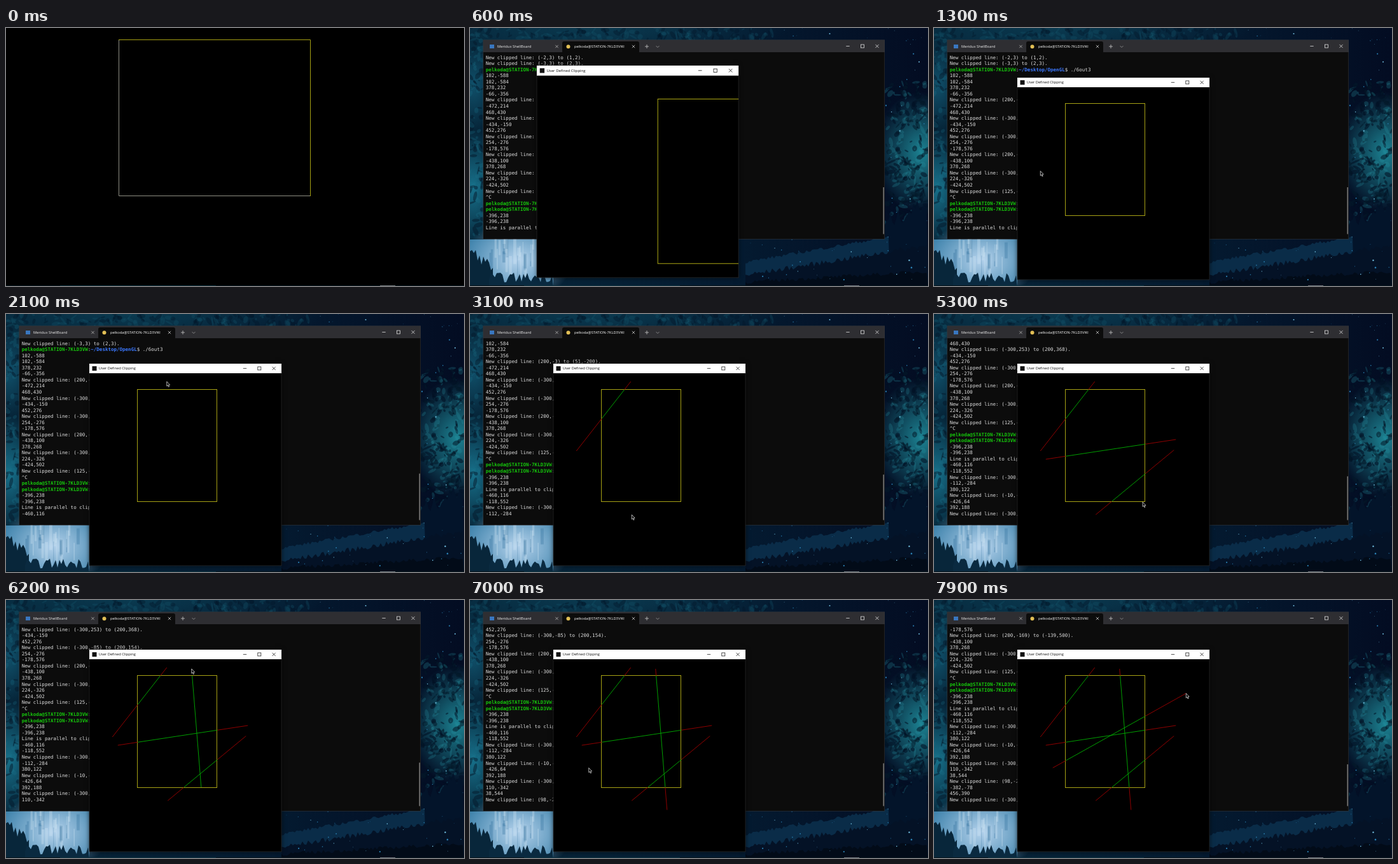
An HTML page with a canvas for the animation above (8 s loop, 720 by 405 pixels).

```html
<!DOCTYPE html>
<html>
<head>
<meta charset="utf-8">
<style>
  html, body { margin: 0; height: 100%; overflow: hidden; background: #000; }
  canvas { display: block; width: 100vw; height: 100vh; }
</style>
</head>
<body>
<canvas id="stage" width="720" height="405"></canvas>
<script>
const LOOP = 8000, STEP = 100, RESTORE = 600, REST = 200;
const UI = '"Open Sans", sans-serif', MONO = '"DejaVu Sans Mono", monospace';
const USER = 'pelkoda@STATION-7KLD3VW';
const YELLOW = '#a6a114', RED = '#a00000', GREEN = '#00b000';
let ctx = document.getElementById('stage').getContext('2d');

// Clip region and clicks in the program's own coordinates
const REGION = { left: -300, right: 200, bottom: -200, top: 500 };
const earlierClicks = [
  [378, 232], [-66, -356], [-472, 214], [468, 430], [-434, -150], [452, 276],
  [254, -276], [-178, 576], [-438, 100], [378, 268], [224, -326], [-424, 502]
];
const clicks = [
  { time: 1500, at: [-460, 116] }, { time: 2300, at: [-118, 552] },
  { time: 3100, at: [-112, -284] }, { time: 3600, at: [380, 122] },
  { time: 4400, at: [-426, 64] }, { time: 4900, at: [392, 188] },
  { time: 5700, at: [110, -342] }, { time: 6300, at: [38, 544] },
  { time: 7200, at: [-382, -78] }, { time: 7900, at: [456, 390] }
];
// The pointer comes in from the corner, hovers, then visits every click
const stops = [{ time: 700, at: [1470, 940] }, { time: 1300, at: [-460, 78] }, ...clicks];

const lerp = (a, b, k) => a + (b - a) * k;
const toStage = ([x, y]) => [282.25 + x / 4, 244 - y / 4];

function clip([x0, y0], [x1, y1]) {
  const dx = x1 - x0, dy = y1 - y0;
  let enter = 0, leave = 1;
  for (const [p, q] of [[-dx, x0 - REGION.left], [dx, REGION.right - x0],
                        [-dy, y0 - REGION.bottom], [dy, REGION.top - y0]]) {
    if (p < 0) enter = Math.max(enter, q / p);
    if (p > 0) leave = Math.min(leave, q / p);
  }
  return [enter, leave].map(u => [x0 + u * dx, y0 + u * dy]);
}

function logClicks(points) {
  return points.flatMap((point, i) => {
    if (i % 2 === 0) return [point.join()];
    const [a, b] = clip(points[i - 1], point).map(p => p.map(Math.trunc).join());
    return [point.join(), `New clipped line: (${a}) to (${b}).`];
  });
}

const history = [
  'New clipped line: (-2,3) to (1,2).', 'New clipped line: (-3,3) to (2,3).',
  '$ ./6out3', '102,-588', '102,-584', ...logClicks(earlierClicks),
  '^C', '$ ', '$ ./6out3', '-396,238', '-396,238', 'Line is parallel to clipping line.'
];

function path(points, color, width = 1) {
  ctx.strokeStyle = color;
  ctx.lineWidth = width;
  ctx.beginPath();
  points.forEach(p => ctx.lineTo(...p));
  ctx.stroke();
}

function fillPath(points, color) {
  ctx.fillStyle = color;
  ctx.beginPath();
  points.forEach(p => ctx.lineTo(...p));
  ctx.fill();
}

function rect(x, y, w, h, color) {
  ctx.fillStyle = color;
  ctx.fillRect(x, y, w, h);
}

function frame(x, y, w, h, color, width = 1) {
  ctx.strokeStyle = color;
  ctx.lineWidth = width;
  ctx.strokeRect(x, y, w, h);
}

function ellipse(x, y, rx, ry, turn, color) {
  ctx.fillStyle = color;
  ctx.beginPath();
  ctx.ellipse(x, y, rx, ry, turn, 0, 7);
  ctx.fill();
}

function text(str, x, y, color, font) {
  ctx.font = font;
  ctx.fillStyle = color;
  ctx.fillText(str, x, y);
}

function cross(x, y, r, color) {
  path([[x - r, y - r], [x + r, y + r]], color, 0.8);
  path([[x - r, y + r], [x + r, y - r]], color, 0.8);
}

function windowButtons(x, y, gap, color) {
  path([[x - 2.7, y], [x + 2.7, y]], color, 0.8);
  frame(x + gap - 2.5, y - 2.5, 5, 5, color, 0.8);
  cross(x + 2 * gap, y, 2.6, color);
}

function paintWallpaper() {
  let seed = 7;
  const random = (from = 0, to = 1) =>
    lerp(from, to, (seed = seed * 16807 % 2147483647) / 2147483647);

  function glow(x, y, rx, ry, color) {
    ctx.save();
    ctx.translate(x, y);
    ctx.scale(rx, ry);
    const g = ctx.createRadialGradient(0, 0, 0, 0, 0, 1);
    g.addColorStop(0, color);
    g.addColorStop(1, color + '00');
    rect(-1, -1, 2, 2, g);
    ctx.restore();
  }
  function mottle(x, y, w, h, count, colors) {
    for (let i = 0; i < count; i++) {
      ellipse(x + random(0, w), y + random(0, h), random(1, 4), random(1, 8),
              random(0, 3), colors[i % colors.length]);
    }
  }
  // Everything below a rough line
  function ridge(x0, y0, x1, y1, rough, color) {
    const points = [[x0, 405]];
    for (let x = x0; x <= x1; x += 3) {
      points.push([x, lerp(y0, y1, (x - x0) / (x1 - x0)) - random(0, rough)]);
    }
    fillPath([...points, [x1, 405]], color);
  }

  const sky = ctx.createLinearGradient(0, 0, 720, 0);
  sky.addColorStop(0, '#06263a');
  sky.addColorStop(0.6, '#041a30');
  sky.addColorStop(1, '#030c22');
  rect(0, 0, 720, 405, sky);

  glow(200, 0, 300, 50, '#0a3a50');
  mottle(0, 0, 480, 18, 150, ['#03142860', '#14546850']);
  glow(5, 90, 40, 70, '#10506a');
  glow(5, 250, 45, 90, '#17708a');
  mottle(0, 20, 21, 310, 90, ['#03182a80', '#1a738c40']);

  glow(710, 195, 75, 95, '#1c8292');
  mottle(652, 85, 68, 230, 260, ['#03182890', '#02102490', '#2894a240']);
  ridge(652, 320, 720, 285, 25, '#03142a');

  // Mist, falling water and the trees in front
  rect(0, 332, 131, 73, '#3f83ac');
  glow(75, 365, 85, 65, '#b4d2ec');
  for (let i = 0; i < 28; i++) {
    rect(random(24, 126), random(325, 360), random(1, 5), random(15, 45),
         i % 3 ? '#d6e8f650' : '#2d6c9850');
  }
  ridge(0, 358, 36, 385, 18, '#08263a');
  ridge(30, 400, 131, 399, 16, '#0a2a40');

  ridge(433, 370, 660, 330, 5, '#0a2c48');
  ridge(433, 392, 720, 345, 8, '#041226');
  ridge(433, 402, 720, 385, 6, '#020b18');
  for (let i = 0; i < 170; i++) {
    const r = 0.3 + random() * random() * 1.1;
    ellipse(random(440, 720), random(0, 400), r, r, 0, i % 3 ? '#2a7eb0' : '#78c8ea');
  }
}

function makeWallpaper() {
  const canvas = document.createElement('canvas'), stage = ctx;
  canvas.width = 720;
  canvas.height = 405;
  ctx = canvas.getContext('2d');
  paintWallpaper();
  ctx = stage;
  return canvas;
}
const wallpaper = makeWallpaper();

function drawTabs() {
  rect(21, 19, 630.5, 19, '#2e2e32');
  ctx.fillStyle = '#0c0c0c';
  ctx.beginPath();
  ctx.roundRect(145, 21, 121, 20, 3);
  ctx.fill();
  rect(31, 26, 7, 6, '#3977c0');
  ellipse(154.5, 29.3, 3, 3, 0, '#e2bf55');
  text('Meridux ShellBoard', 43, 29.5, '#f0f0f0', '5.8px ' + UI);
  ctx.save();
  ctx.beginPath();
  ctx.rect(160, 20, 88, 18);
  ctx.clip();
  text(USER + ':', 164, 29.5, '#fff', '5.8px ' + UI);
  ctx.restore();
  cross(136.5, 29, 2.2, '#b5b5b5');
  cross(257, 29, 2.2, '#c8c8c8');
  path([[275, 29], [281, 29]], '#c8c8c8', 0.8);
  path([[278, 26], [278, 32]], '#c8c8c8', 0.8);
  path([[292.5, 28], [295, 30.5], [297.5, 28]], '#999', 0.8);
  windowButtons(594, 28.5, 23, '#e0e0e0');
}

function drawTerminal(lines) {
  rect(20.5, 18.5, 631.5, 313, '#3b3b3d');
  rect(21, 38, 630.5, 293, '#0c0c0c');
  drawTabs();
  const first = lines.length - 29, font = '7.53px ' + MONO;
  lines.slice(first).forEach((line, row) => {
    const parts = line[0] === '$'
      ? [[USER, '#16c60c', 'bold '], [':', '#ddd', ''], ['~/Desktop/OpenGL', '#3b78ff', 'bold '], [line, '#ddd', '']]
      : [[line, '#e0e0e0', '']];
    let x = 24.7;
    for (const [str, color, weight] of parts) {
      text(str, x, 46.7 + row * 9.54, color, weight + font);
      x += ctx.measureText(str).width;
    }
  });
  const top = 250 + first * 0.53;
  rect(649.5, top, 1.3, 323.5 - top, '#8d8d8d');
}

function drawClipWindow(x, y, scale, drawContent) {
  ctx.save();
  ctx.translate(x, y);
  ctx.scale(scale, scale);
  ctx.shadowColor = '#000a';
  ctx.shadowBlur = 7;
  rect(0, 0, 302, 317, '#000');
  ctx.shadowBlur = 0;
  frame(0, 0, 302, 317, '#303030', 0.6);
  rect(0, 0, 302, 15, '#fff');
  rect(4.5, 4, 7, 7, '#111');
  text('User Defined Clipping', 14.7, 7.8, '#111', '5.75px ' + UI);
  windowButtons(244.5, 7.4, 22.8, '#222');
  ctx.beginPath();
  ctx.rect(0, 15, 302, 302);
  ctx.clip();
  ctx.translate(-x, -y);
  drawContent();
  ctx.restore();
}

function drawClippedLines(time) {
  frame(206.5, 118.5, 125, 176, YELLOW);
  for (let i = 1; i < clicks.length; i += 2) {
    const start = clicks[i - 1].at, end = clicks[i].at;
    const [a, b] = clip(start, end).map(toStage);
    if (time >= clicks[i].time) {
      path([toStage(start), a], RED, 0.9);
      path([b, toStage(end)], RED, 0.9);
    }
    // The inner part is painted just before the rest
    if (time >= clicks[i].time - STEP) path([a, b], GREEN, 0.9);
  }
}

function drawPointer(time) {
  const next = stops.findIndex(s => s.time > time);
  if (next < 1) return;
  const from = stops[next - 1], to = stops[next];
  const travel = Math.max(STEP, to.time - REST - from.time);
  const u = Math.min(1, (time - from.time) / travel), k = u * u * (3 - 2 * u);
  drawArrow(from.at.map((v, i) => lerp(v, to.at[i], k)));
}

function drawArrow(position) {
  const arrow = [[0, 0], [0, 7.2], [1.6, 5.8], [2.7, 8.4], [3.9, 7.9], [2.8, 5.4], [4.9, 5.2], [0, 0]];
  ctx.save();
  ctx.translate(...toStage(position));
  fillPath(arrow, '#080808');
  path(arrow, '#e4e4e4', 0.75);
  ctx.restore();
}

function drawMaximized() {
  rect(0, 0, 720, 405, '#000');
  path([[177.5, 18], [177.5, 263.5], [478.5, 263.5]], '#8f8f84');
  path([[177, 18.5], [478.5, 18.5], [478.5, 264]], YELLOW);
}

function drawDesktop(time) {
  ctx.drawImage(wallpaper, 0, 0);
  const done = clicks.filter(c => c.time <= time).map(c => c.at);
  drawTerminal([...history, ...logClicks(done)]);
  if (time < RESTORE + STEP) {
    // Still shrinking, with the maximized picture inside
    drawClipWindow(105, 59, 1.05, () => frame(286.2, 109, 302, 246, YELLOW));
  } else {
    drawClipWindow(131, 78, 1, () => drawClippedLines(time));
  }
  const last = clicks[clicks.length - 1];
  if (time < last.time) drawPointer(time);
  else drawArrow(last.at);
}

function draw(time) {
  ctx.textBaseline = 'middle';
  if (time < RESTORE) drawMaximized();
  else drawDesktop(time);
  // Top edge of the taskbar
  rect(0, 404, 720, 1, '#07151c');
  rect(85, 404, 245, 1, '#0c303d');
  rect(588, 404, 24, 1, '#737b80');
}

const begin = performance.now();
function tick() {
  const time = (performance.now() - begin) % LOOP;
  draw(Math.floor(time / STEP) * STEP);
  requestAnimationFrame(tick);
}
tick();
</script>
</body>
</html>
```
